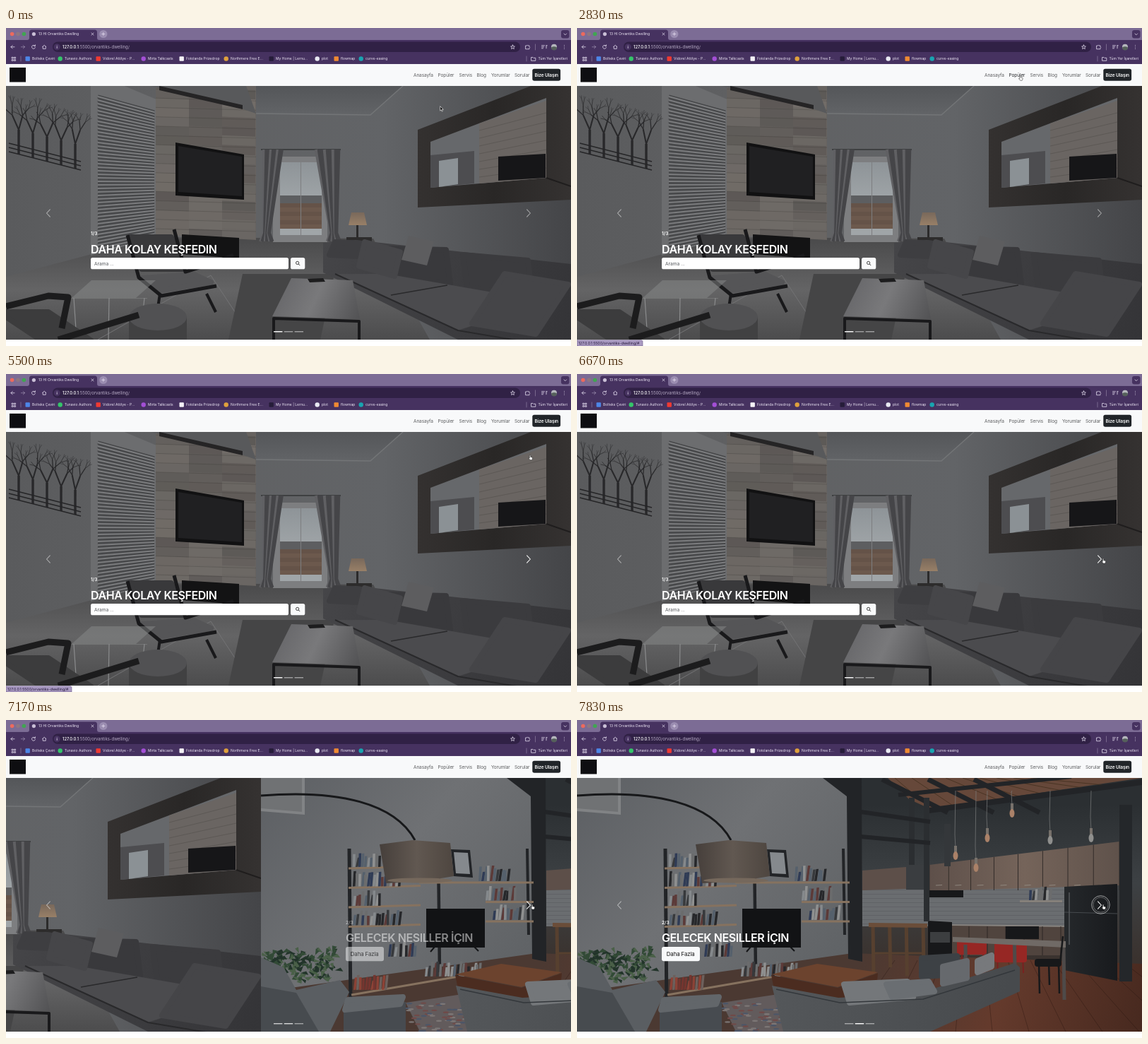
An HTML page with a canvas for the animation above (8000 ms loop, 800x450 px).

```html
<!DOCTYPE html>
<html lang="tr">
<head>
<meta charset="utf-8">
<title>Orvantiks Dwelling</title>
<style>
html, body { margin: 0; width: 100%; height: 100%; overflow: hidden; background: #fff; }
#stage { position: relative; width: 800px; height: 450px; overflow: hidden; background: #fff; }
svg, canvas { position: absolute; left: 0; top: 0; display: block; }
#view { position: absolute; top: 82px; width: 800px; height: 359px; overflow: hidden; }
.slide { position: absolute; width: 800px; height: 359px; }
text { font-family: Inter, "Open Sans", sans-serif; white-space: pre; }
.head { font-size: 16px; font-weight: 600; letter-spacing: -.42px; fill: #fff; }
.count { font-size: 6.6px; font-weight: 600; fill: #fff; }
.nav { font-size: 6.5px; letter-spacing: -.1px; fill: #5c5d5f; }
.nav:last-child { font-weight: 600; fill: #fff; }
.mark { font-size: 5px; fill: #eee8f6; }
.icon { fill: none; stroke: #e4dcef; stroke-width: .8; stroke-linecap: round; stroke-linejoin: round; }
.chevron { fill: none; stroke: #fff; stroke-width: 1.1; stroke-linecap: round; stroke-linejoin: round; }
</style>
</head>
<body>
<div id="stage">
  <div id="view">
    <div class="slide" id="one">
      <canvas width="800" height="359"></canvas>
      <svg width="800" height="359" viewBox="0 82 800 359">
        <g class="caption">
          <text class="count" x="120" y="293">1/3</text>
          <text class="head" x="120" y="318.5">DAHA KOLAY KEŞFEDIN</text>
          <rect x="120" y="325" width="280" height="16.3" rx="2.6" fill="#fff"/>
          <text x="125" y="335.7" font-size="6.6" fill="#55585c">Arama ...</text>
          <rect x="403" y="325" width="20.3" height="16.3" rx="2.6" fill="#f8f9fa"/>
          <path d="M414.2 334l2 2m-1.500-3.600a2.100 2.100 0 1 0-4.200 0a2.100 2.100 0 1 0 4.200 0" fill="none" stroke="#111" stroke-width=".8"/>
        </g>
      </svg>
    </div>
    <div class="slide" id="two">
      <canvas width="800" height="359"></canvas>
      <svg width="800" height="359" viewBox="0 82 800 359">
        <g class="caption">
          <text class="count" x="120" y="289">2/3</text>
          <text class="head" x="120" y="314">GELECEK NESILLER İÇIN</text>
          <rect x="120" y="321" width="54" height="20.3" rx="3" fill="#f8f9fa"/>
          <text x="126.8" y="334" font-size="7.8" letter-spacing="-.08" fill="#111">Daha Fazla</text>
        </g>
      </svg>
    </div>
  </div>
  <svg width="800" height="450">
    <path class="chevron" d="M62.3 256.8l-4.8 5.2 4.8 5.2" opacity=".5"/>
    <path class="chevron" id="next" d="M737.6 256.8l4.8 5.2-4.8 5.2"/>
    <g id="ring" fill="none" stroke="#fff" stroke-width=".8"><circle cx="741.5" cy="261.5" r="12.8" opacity=".7"/><circle cx="741.5" cy="261.5" r="10.6" opacity=".4"/></g>
    <g id="dots" fill="#fff"></g>

    <rect width="800" height="18" fill="#7c6c95"/>
    <rect y="17" width="800" height="34" fill="#463260"/>
    <circle cx="8.6" cy="8.5" r="2.8" fill="#ec6a5e"/><circle cx="17" cy="8.5" r="2.8" fill="#8d7780"/><circle cx="25.4" cy="8.5" r="2.8" fill="#40a552"/>
    <path d="M30 17q3 0 3-3V6q0-3.500 3.500-3.500h89q3.500 0 3.500 3.500v8q0 3 3 3z" fill="#463260"/>
    <circle cx="39.4" cy="8.6" r="2.6" fill="#c9bfd6"/>
    <text class="mark" x="46" y="10.4">13 HI Orvantiks Dwelling</text>
    <circle cx="137.8" cy="8.5" r="5.6" fill="#9b8db1"/>
    <rect x="786" y="3" width="11.5" height="11.5" rx="3" fill="#463260"/>
    <rect x="66" y="19.5" width="662" height="14.5" rx="7.2" fill="#302145"/>
    <circle cx="72.2" cy="26.8" r="4.6" fill="#463260"/>
    <text x="80" y="29" font-size="5.9" fill="#b7abc6"><tspan fill="#fff" font-weight="500">127.0.0.1</tspan>:5500/orvantiks-dwelling/</text>
    <g class="icon">
      <path d="M121 7l3 3m0-3l-3 3M135.800 8.500h4m-2-2v4M790 8l1.800 1.800L793.600 8"/>
      <path d="M12 26.800H7m2.200-2.200L7 26.800 9.200 29"/>
      <path d="M21.500 26.800h5m-2.200-2.200l2.200 2.200-2.200 2.200" opacity=".5"/>
      <path d="M41 25.300a2.500 2.500 0 1 0 .4 2.300M41.400 23.800v1.800h-1.800M51.700 26.500l2.500-2.200 2.500 2.200M52.200 26.300v3.100h4v-3.100"/>
      <path d="M72.200 26.500v2m0-3.500v.1"/>
      <path d="M717.500 24l.8 1.900 2.100.2-1.600 1.400.5 2.100-1.800-1.100-1.800 1.100.5-2.100-1.600-1.400 2.100-.2z"/>
      <path d="M736 25h1.500q1-2 2 0h1.500v1.600q1.500.8 0 1.700v1.500H736z"/>
      <path d="M758.500 24.800h4m-4 2h3m-3 2h2m4.500-4v4m0-4h1.200M790.500 24.600v.1m0 2.200v.1m0 2.200v.1"/>
      <path d="M749.500 23v8M21 40v7M737 40v7" opacity=".4"/>
      <path d="M8.500 41.300h1.700V43H8.500zm3.400 0h1.700V43h-1.700zm-3.400 3.400h1.700v1.700H8.500zm3.400 0h1.700v1.700h-1.700z"/>
      <path d="M744 41.500h2l.8.8h3v4H744z"/>
    </g>
    <circle cx="776" cy="26.8" r="4" fill="#b5b7bd"/><path d="M772 27.500q4-2.500 8 0a4 4 0 0 1-8 0z" fill="#55605b"/>
    <g id="marks"></g>

    <rect y="51" width="800" height="31" fill="#f8f9fa"/>
    <rect x="5" y="56" width="23" height="20.5" fill="#0e0e11"/>
    <rect x="745.3" y="57.8" width="39.8" height="17" rx="2.8" fill="#212529"/>
    <g id="nav"></g>
    <g id="status"><path d="M0 441.800h91q2 0 2 2v6.200H0z" fill="#a99ac2" stroke="#6d5c88" stroke-width=".6"/><text x="2" y="447.8" font-size="5.2" fill="#24173a">127.0.0.1:5500/orvantiks-dwelling/#</text></g>
    <path id="arrow" d="M0 0v6.400l1.500-1.400 1 2.400 1.100-.5-1-2.300h2z" fill="#111" stroke="#fff" stroke-width=".6"/>
    <path id="hand" d="M0 0q.8 0 .8.800v2l2 .4q1 .2.800 1.100l-.3 1.600-.6 1.100H.1l-1.900-2.400q-.2-.8.700-.6l.4.400V.8Q-.7 0 0 0z" fill="#fff" stroke="#111" stroke-width=".5"/>
  </svg>
</div>
<script>
const $ = id => document.getElementById(id);

const marks = [
  [37, 'Bolteks Çeviri', '#4d86e8'], [83, 'Tunavio Authors', '#35c56a'], [137, 'Vidorel Atölye - P...', '#f03a32'],
  [201, 'Mirta Talkcasts', '#a44fd6'], [255, 'Fotolanda Prizedrop', '#f4f2f6'], [318, 'Northmere Free E...', '#e0a13c'],
  [382, 'My Home | Lernu...', '#251c38'], [447, 'plot', '#e9e9f2'], [474, 'flowmap', '#f08a32'],
  [509, 'curve-easing', '#18a5b0'], [753.5, 'Tüm Yer İşaretleri', 'none']
];
$('marks').innerHTML = marks.map(([x, name, color], i) =>
  `<rect x="${x - 9.5}" y="40.3" width="6.4" height="6.4" rx="${i % 2 ? 3.2 : 1}" fill="${color}"/>
   <text class="mark" x="${x}" y="45.3">${name}</text>`).join('');

const links = [[577, 'Anasayfa'], [611.5, 'Popüler'], [641.5, 'Servis'], [666.5, 'Blog'],
  [687, 'Yorumlar'], [720, 'Sorular'], [748.5, 'Bize Ulaşın']];
$('nav').innerHTML = links.map(([x, name]) => `<text class="nav" x="${x}" y="69">${name}</text>`).join('');
$('dots').innerHTML = [0, 1, 2].map(i => `<rect x="${379 + i * 14.8}" y="429" width="12.4" height="1.4"/>`).join('');

// Painting helpers
let c, seed;
const rnd = (a = 0, b = 1) => a + (b - a) * (seed = seed * 16807 % 2147483647) / 2147483647;
const pick = list => list[Math.floor(rnd(0, list.length))];
const times = (n, f) => { for (let i = 0; i < n; i++) f(i); };

function trace(p) {
  c.beginPath();
  for (let i = 0; i < p.length; i += 2) c.lineTo(p[i], p[i + 1]);
}
function poly(fill, ...p) { trace(p); c.fillStyle = fill; c.fill(); }
function line(color, w, ...p) { trace(p); c.strokeStyle = color; c.lineWidth = w; c.stroke(); }
function box(fill, x, y, w, h) { c.fillStyle = fill; c.fillRect(x, y, w, h); }
function oval(fill, x, y, rx, ry) { c.beginPath(); c.ellipse(x, y, rx, ry, 0, 0, 7); c.fillStyle = fill; c.fill(); }
// Slanted panel: the right edge drops by d at the top and e at the bottom
function slab(fill, x, y, w, h, d = 0, e = d, lean = 0) {
  poly(fill, x, y, x + w, y + d, x + w + lean, y + h + e, x + lean, y + h);
}
function cushion(fill, ...q) {
  slab(fill, ...q);
  c.closePath();
  c.strokeStyle = fill;
  c.lineWidth = 8;
  c.stroke();
}
function fade(x0, y0, x1, y1, ...colors) {
  const g = c.createLinearGradient(x0, y0, x1, y1);
  colors.forEach((k, i) => g.addColorStop(i / (colors.length - 1), k));
  return g;
}
function start(id) {
  c = document.querySelector(`#${id} canvas`).getContext('2d');
  c.translate(0, -82);
  c.lineJoin = 'round';
  seed = 77;
}

function branch(x, y, a, len, w) {
  const x2 = x + Math.cos(a) * len, y2 = y + Math.sin(a) * len;
  line('#28282a', w, x, y, x2, y2);
  if (len > 7) for (const s of [-1, 1]) branch(x2, y2, a + s * rnd(.2, .5), len * rnd(.55, .67), w * .6);
}

function drape(x, w, end) {
  times(9, i => line(i % 3 ? '#454548' : '#606063', w / 7, x + w * i / 8, 172, end - 4 + i, 290, end - 9 + i * 2.2, 302));
}

function lounge() {
  start('one');
  const black = '#19191b';
  box(fade(0, 82, 800, 82, '#5a5b5d', '#606163', '#626467', '#444548'), 0, 82, 800, 359);
  poly(fade(0, 82, 0, 123, '#545659', '#626467'), 300, 82, 562, 82, 516, 123, 353, 121);
  line('#737577', 1.5, 353, 121, 516, 123, 562, 82);
  poly(fade(0, 300, 0, 441, '#4b4b4c', '#646465', '#4c4c4d'), 0, 352, 212, 296, 520, 298, 600, 441, 0, 441);
  line('#737375', 1, 130, 441, 290, 350, 350, 441);

  // Blinds, plank wall
  slab('#6c6d6f', 120, 62, 93, 260, 39, -26);
  times(44, i => {
    line('#464749', 5, 130, 97 + i * 5, 210, 119 + i * 4.1);
    line('#7b7c7e', 2, 130, 97 + i * 5, 210, 119 + i * 4.1);
  });
  slab('#676360', 212, 82, 142, 210, 0, 8);
  times(16, i => {
    const y = 86 + i * 13.2;
    times(3, k => slab(`rgba(${pick(['30,28,27', '170,160,150'])},${rnd(.03, .14)})`, 212 + k * 47, y, 47, 13, 2));
    line('rgba(40,38,37,.35)', .6, 212, y, 354, y + 4);
  });
  poly('#58595b', 205, 82, 340, 82, 354, 121, 330, 113);
  slab('#252425', 217, 82, 118, 6, 27, 27);
  slab('#111112', 240, 162, 97, 75, 17, 6);
  slab('#202022', 244, 167, 90, 65, 15, 6);
  slab('#131314', 249, 292, 81, 28, 5, 6);

  // Window
  box('#7d7e80', 378, 182, 77, 121);
  times(2, i => {
    const x = 388 + i * 30;
    box(fade(0, 190, 0, 245, '#8e9498', '#a0a5a8'), x, 190, 29, 103);
    box('#5d5e60', x, 237, 29, 12);
    times(6, k => box(k % 2 ? '#6c594d' : '#655348', x, 248 + k * 6, 29, 6));
  });
  line('#333436', 1.5, 361, 172, 474, 172);
  drape(365, 26, 369);
  drape(439, 32, 464);

  // Lamp, mirror
  poly(fade(0, 260, 0, 280, '#77675a', '#9a8168'), 489, 261, 507, 261, 511, 279, 485, 279);
  box('#2c2b2b', 496, 279, 3, 18);
  box('#2d2c2c', 482, 296, 36, 17);
  slab(fade(583, 0, 800, 0, '#343130', '#292726', '#353231'), 583, 144, 217, 110, -84, -11);
  slab('#66686b', 601, 161, 164, 65, -62, -14);
  slab('#6a6562', 670, 135, 95, 85, -32, -8);
  times(7, i => line('rgba(40,38,37,.3)', .7, 670, 145 + i * 11, 765, 120 + i * 13));
  slab('#4d4d50', 601, 180, 62, 46, -6);
  slab('#8b9195', 613, 188, 27, 37, -4);
  slab('#161618', 697, 182, 67, 34, -4);
  line('#1f1d1d', 2, 765, 212, 800, 224);

  // Wall art
  times(5, i => branch(18 + i * 20, 179 + i * 5, -1.57, 35, 3.4));
  times(3, i => line('#252527', 1.5, 4, 163 + i * 6, 106, 189 + i * 6));

  // Rug, chairs, side table, stool
  slab('#454546', 335, 348, 130, 93, 0, 0, -20);
  cushion('#39393b', 176, 296, 58, 45, 0, 0, 16);
  cushion('#555557', 192, 354, 74, 18, -5, -12, 24);
  times(2, i => {
    const x = 172 + i * 66, y = 293 - i * 8;
    line(black, 5, x, y, x + 16, y + 60, x + 48, y + 86 - i * 36, x + 126 - i * 42, y + 72 - i * 36);
    line(black, 4, x + 46, 376, x + 42 + i * 17, 402);
  });
  slab('rgba(135,137,138,.5)', 90, 382, 110, 1, 0, 0, 0);
  slab('rgba(135,137,138,.5)', 121, 357, 91, 25, 0, 0, -28);
  times(3, i => line('#8b8c8d', 1.2, 96 + i * 50, 382, 100 + i * 45, 441));
  box('#414142', 174, 409, 82, 32);
  oval('#515153', 215, 409, 41, 19);
  cushion('#3c3c3d', -10, 402, 70, 40, 0, 0, 60);
  line('#1c1c1d', 9, 0, 394, 60, 379, 88, 381, 79, 425);
  line('#1c1c1d', 9, 74, 441, 188, 406);

  // Sofa
  poly(fade(450, 300, 800, 441, '#454548', '#343437'), 449, 304, 495, 300, 800, 334, 800, 441, 640, 441, 449, 346);
  times(2, i => cushion(i ? '#3b3b3e' : '#39393c', 537 + i * 110, 312 + i * 9, 86 + i * 6, 38 + i * 8, 2 + i * 6, 12, 6));
  slab('#4b4b4e', 466, 348, 79, 1, 0, 0);
  poly('#4b4b4e', 466, 348, 545, 349, 712, 378, 664, 420, 640, 428);
  line('#29292b', 2, 466, 348, 640, 428, 800, 455);
  line('#29292b', 1.5, 545, 378, 625, 364);
  times(2, i => cushion(i ? '#464649' : '#3e3e41', 466 + i * 42, 303, 40 + i * 10, 18 + i * 16, 2 + i * 12, 2 + i * 12, -8));
  slab('#5d5d5f', 570, 294, 36, 34, 8, 8, -10);
  cushion('#454548', 706, 348, 90, 70, 15, 15, -46);

  // Coffee table
  poly(fade(377, 354, 500, 412, '#626265', '#79797b', '#525254'), 404, 354, 491, 357, 501, 412, 377, 408);
  line(black, 4, 379, 441, 379, 411, 500, 415, 500, 441);
  slab('#1d1d1e', 427, 355, 22, 5, -1, -1, 3);
}

const bookTones = ['#2f3b55', '#85898c', '#37393c', '#5c3a38', '#8f9090', '#55606c', '#26272a', '#6b6c6d'];
function books(x, y, n, tones = bookTones) {
  times(n, i => slab(pick(tones), x + i * 4, y, 3.5, -rnd(13, 22), -.2, -.2, rnd(0, 3)));
}
function legs(color, w, x0, x1, n, top, bottom) {
  times(n, i => {
    const x = x0 + (x1 - x0) * i / (n - 1);
    line(color, w, x, top, x + 1, bottom - i % 2 * 12);
  });
}

function loft() {
  start('two');
  const dark = '#222427', black = '#17181a', wood = '#57402f';
  box(fade(0, 82, 350, 360, '#5c5f63', '#6f7174', '#606366'), 0, 82, 400, 359);
  box(fade(0, 120, 0, 340, '#2b2f32', '#3d4144', '#3a322e'), 385, 82, 415, 359);

  // Ceiling
  poly('#66483a', 440, 82, 800, 82, 620, 108, 505, 128, 470, 112);
  times(9, i => line('#43301f', .8, 450 + i * 24, 82, 500 + i * 32, 125 - i * 4));
  times(3, i => line(dark, 7, 432 + i * 65, 84, 525 + i * 65, 131));
  line(dark, 8, 498, 128, 800, 88);
  line(dark, 6, 455, 106, 700, 80);

  // Floor
  poly(fade(400, 330, 800, 441, '#4b3932', '#643a2c', '#47291f'), 0, 385, 390, 330, 800, 345, 800, 441, 0, 441);
  times(13, i => line('rgba(25,12,9,.3)', 1, 450 + i * 32, 340, 380 + i * 52, 441));

  // Kitchen
  box('#6a6d70', 404, 236, 290, 56);
  times(9, i => box('rgba(50,53,56,.22)', 404, 240 + i * 6, 290, .8));
  slab('#5d4f49', 404, 213, 62, 28, -5, -2);
  slab(fade(500, 0, 768, 0, '#5e504a', '#75645a', '#5f524b'), 499, 205, 269, 37, -33, -8);
  times(9, i => {
    const x = 499 + 269 * (i / 8) ** 1.1;
    line('#332d2a', 1, x, 205 - (x - 499) * .123, x, 241);
    line('#99928a', .8, x + 9, 234, x + 18, 233.5);
  });
  box('#3a3d40', 466, 205, 33, 35);
  box(black, 497, 241, 50, 10);
  box('#85807a', 627, 255, 60, 3);
  books(640, 255, 8);
  box('#50443e', 530, 291, 162, 42);
  line('#85817d', 2, 530, 290, 692, 292);
  times(6, i => line('#2d2725', 1, 555 + i * 26, 292, 555 + i * 26, 333));
  box(black, 607, 292, 47, 18);
  slab(black, 497, 284, 34, 53, 2, 4);
  box('#3c3e40', 500, 300, 28, 15);
  slab(fade(690, 0, 766, 0, '#25282b', '#181a1d'), 690, 236, 75, 118, -4, 15);
  line('#464a4e', 1, 690, 272, 765, 274);
  line('#54585b', 1.5, 697, 244, 697, 318);
  box('#24272a', 768, 120, 18, 250);

  // Columns
  poly(dark, 348, 82, 403, 82, 404, 342, 384, 338, 382, 108);
  times(2, i => line('#2b2e31', 8, 474 + i * 21, 110, 474 + i * 21, 205 + i * 80));
  times(2, i => line(dark, 6, 402, 130 + i * 35, 500, 144 + i * 30));
  box('#34373a', 520, 147, 9, 60);

  // Tables and chairs
  legs(wood, 5, 419, 490, 4, 291, 362);
  line('#6a4d39', 6, 413, 290, 496, 291);
  line(wood, 3, 418, 330, 490, 330);
  times(2, i => {
    legs('#7a2120', 2, 545 + i * 50, 575 + i * 56, 2, 330, 370);
    cushion('#962724', 542 + i * 53, 313 + i * 4, 34 + i * 4, 15 + i * 7);
  });
  legs('#4e4a49', 5, 550, 689, 3, 318, 396);
  slab('#706a66', 532, 307, 160, 7, 6, 8);
  legs(black, 2.5, 654, 682, 3, 344, 387);
  cushion(black, 652, 342, 30, 3);
  line(black, 2.5, 688, 306, 684, 345);

  // Pendants
  for (const [x, y] of [[536, 192], [565, 209], [581, 167], [616, 132], [670, 170], [728, 167]]) {
    line('#7c7d7d', .7, x, 100, x - 1, y - 30, x, y - 10);
    box('#77716b', x - 2, y - 14, 4, 9);
    oval(x < 620 ? '#aa8168' : '#8f8f8d', x, y, 3.5, 6);
  }

  // Poster, shelves, screen
  slab('#818385', 0, 82, 62, 47, 0, 5);
  slab('#707274', 0, 82, 58, 43, 0, 5);
  times(3, i => line(dark, 5 - i * .5, 125 + i * 126, 182, 127 + i * 126, 410 - i * 53));
  times(4, i => {
    const y = 210 + i * 27.5;
    line('#86725f', 3, 124, y, 226, y - 3);
    books(130, y - 2, 10 + i % 2 * 7);
    if (i == 3) return;
    line('#86725f', 3, i ? 318 : 224, y + 20, 386, y + 20);
    books(308 + i * 10, y + 18, 11);
  });
  line('#86725f', 3, 128, 389, 320, 356);
  times(2, i => books(180 + i * 52, 335 + i * 28, 10 + i * 10));
  books(131, 382, 12, ['#74352f', '#8c4236', '#6d605c']);
  slab(dark, 269, 183, 27, 38, 1, 2, 4);
  slab('#85898d', 273, 187, 20, 30, 1, 1, 3);
  box('#121315', 234, 267, 83, 55);
  line('#121315', 2, 240, 328, 246, 321, 302, 321, 308, 327);

  // Arc lamp
  c.beginPath();
  c.moveTo(0, 107);
  c.bezierCurveTo(110, 98, 190, 118, 218, 170);
  c.strokeStyle = black;
  c.lineWidth = 3;
  c.stroke();
  poly(fade(168, 0, 273, 0, '#463f3b', '#615851', '#4e4640'), 168, 176, 215, 170, 268, 174, 273, 221, 225, 229, 177, 231);
  oval('#75685c', 225, 227, 46, 3.5);

  // Plant, armchair, stool, rug
  times(160, i => {
    const x = rnd(8, 105), y = rnd(328, 366), a = rnd(0, 6);
    poly(['#22342a', '#324a36', '#4a6048'][i % 3], x, y, x + 9 * Math.cos(a), y + 9 * Math.sin(a), x + 12 * Math.cos(a + .6), y + 9 * Math.sin(a + .6));
  });
  slab('#625b5c', 205, 400, 80, 41, -12, 0, 20);
  times(60, i => oval(['#704a48', '#4c5668', '#7d7776'][i % 3], rnd(208, 290), rnd(400, 440), 4, 1.2));
  poly('#5a5e62', 0, 336, 32, 350, 50, 382, 112, 368, 125, 385, 98, 441, 0, 441);
  poly('#474b4f', 0, 377, 50, 386, 82, 441, 0, 441);
  slab('#474b50', 117, 405, 88, 36, -6, 0);
  cushion('#62666a', 123, 396, 78, 14, -4, -8, -4);

  // Coffee table and couch
  poly('#6c432e', 275, 360, 340, 345, 426, 357, 369, 378);
  poly('#4b2c20', 275, 361, 369, 379, 426, 358, 424, 378, 365, 400, 280, 385);
  poly(fade(280, 380, 600, 441, '#54575a', '#474a4d'), 276, 376, 370, 393, 480, 388, 620, 344, 627, 350, 627, 384, 500, 441, 292, 441);
  cushion('#3d4145', 488, 337, 50, 26, -3);
  times(2, i => cushion(i ? '#6a6e72' : '#74777a', 378 + i * 60, 374, 90 - i * 30, 26 - i * 8, -4, -8, 8));
  times(2, i => cushion(i ? '#77797c' : '#66696d', 518 + i * 49, 349 - i * 8, 34 - i * 14, 24 - i * 8, -8));
  line('#33373b', 1.5, 282, 381, 372, 400, 490, 395, 620, 354);
}

lounge();
loft();

// Time runs in ticks, six a second
const slideStart = 41, slideSteps = [0, 156, 439, 769, 800];
const mouseKeys = [[3, 614.7, 110.7], [12, 592, 66], [15, 595, 66], [17, 627.5, 67.2], [29, 732, 66],
  [31, 764, 68], [33, 742, 114.7], [40, 745, 261]];

const clamp = (v, a, b) => Math.min(b, Math.max(a, v));
function mouseAt(t) {
  const i = clamp(mouseKeys.findIndex(k => k[0] > t), 1, 7) || 7;
  const [a, b] = t >= 40 ? [mouseKeys[7], mouseKeys[7]] : [mouseKeys[i - 1], mouseKeys[i]];
  const p = clamp((t - a[0]) / (b[0] - a[0] || 1), 0, 1);
  return [1, 2].map(n => a[n] + (b[n] - a[n]) * p);
}
const show = (id, on) => $(id).style.display = on ? '' : 'none';

function render(now) {
  const t = Math.floor((now % 8000 + 5) * 6 / 1000) % 48;
  const shift = slideSteps[clamp(t - slideStart, 0, 4)];
  const [x, y] = mouseAt(t);
  $('one').style.transform = `translateX(${-shift}px)`;
  $('two').style.transform = `translateX(${800 - shift}px)`;
  const sliding = shift > 0 && shift < 800;
  document.querySelectorAll('.caption').forEach(g => g.setAttribute('opacity', sliding ? .5 : 1));

  const inNav = y > 58 && y < 75, onNext = x > 680 && y > 82, pointing = inNav || onNext;
  const over = inNav ? links.filter(l => x > l[0] - 3.3).length - 1 : -1;
  [...$('nav').children].forEach((el, i) => el.style.fill = i == over && i < 6 ? '#26282b' : '');
  $('next').setAttribute('opacity', onNext ? .95 : .5);
  const p = clamp((t - slideStart) / 3.5, 0, 1);
  [1 - p / 2, .5 + p / 2, .5].forEach((o, i) => $('dots').children[i].setAttribute('opacity', o));

  show('status', t >= 12 && t < 35);
  show('ring', t == 47);
  show('hand', pointing);
  show('arrow', !pointing);
  for (const id of ['hand', 'arrow']) $(id).setAttribute('transform', `translate(${x} ${y})`);
}
const begin = performance.now();
function loop() {
  render(performance.now() - begin);
  requestAnimationFrame(loop);
}
loop();
</script>
</body>
</html>
```
